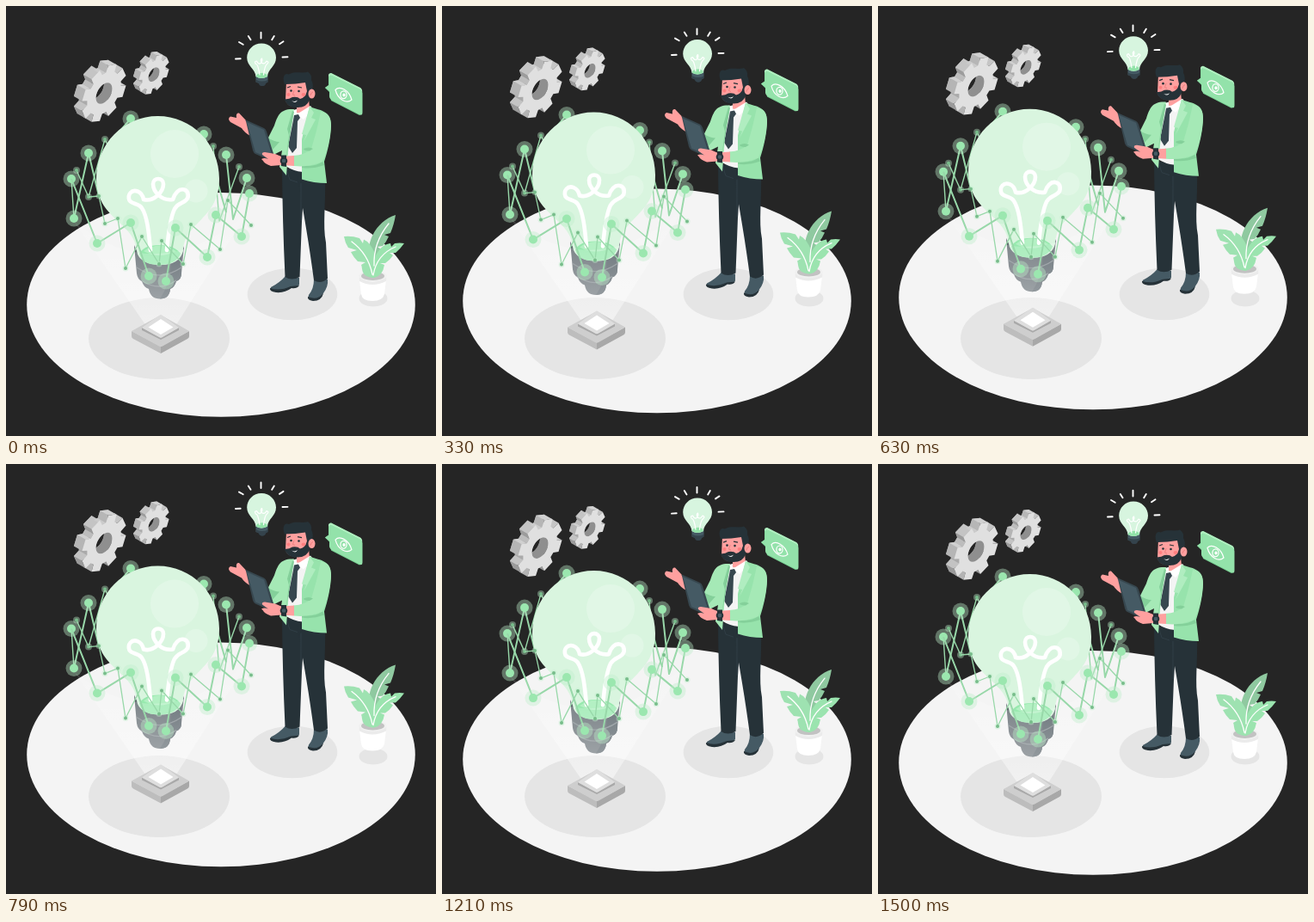
An HTML page for the animation above (1540 ms loop, 500 by 500 pixels).

```html
<!DOCTYPE html>
<html lang="en">
<head>
<meta charset="utf-8">
<title>Floating idea</title>
<style>
  html, body { margin: 0; height: 100%; overflow: hidden; background: #252525; }
  svg { display: block; width: 100vw; height: 100vh; }
  .line { fill: none; stroke: #fff; stroke-linecap: round; stroke-linejoin: round; }
  .net { fill: none; stroke: #98d8a9; stroke-linejoin: round; }
  .skin { fill: #ffa09f; }
  .dark { fill: #263238; }
  .slate { fill: #455a64; }
  .jacket { fill: #a5e9b6; }
  .fold { fill: #84d09a; }
</style>
</head>
<body>
<svg viewBox="0 0 500 500">
  <defs>
    <linearGradient id="beam" x1="0" y1="1" x2="0" y2="0">
      <stop offset="0" stop-color="#fff" stop-opacity=".5"/>
      <stop offset="1" stop-color="#fff" stop-opacity=".05"/>
    </linearGradient>
  </defs>
  <rect width="500" height="500" fill="#252525"/>
  <g class="float"><ellipse cx="250" cy="347.300" rx="225.800" ry="130.400" fill="#f4f4f4"/></g>

  <g fill="#e5e5e5">
    <ellipse cx="178" cy="386.500" rx="82" ry="47.400"/>
    <ellipse cx="333" cy="335" rx="52.300" ry="30.200"/>
    <ellipse cx="427" cy="340" rx="16.500" ry="9.500"/>
  </g>

  <g class="float">
    <g id="gears"></g>

    <!-- small bulb -->
    <path class="line" stroke-width="1.900" d="M296.500 30.800V37.500M281.800 35L284.500 39.300M271 42L275.700 44.700M267 61.500L272.700 61.200M311.800 35L309.200 39.300M322.500 41.300L318 44.300M327.500 59.300L321.500 59.500"/>
    <path class="slate" d="M290.500 81V88.500L294 90Q294.500 93 298 93T302 90L304.500 88.500V81Z"/>
    <path class="dark" opacity=".55" d="M291 86Q298 89 304.500 86V88.500L302 90Q302 93 298 93T294 90L291 88.500Z"/>
    <path fill="#d7f5df" d="M297 43.500C287.500 43.500 280.200 51 280.200 60C280.200 70 290 73 290.500 82Q297 86 304 82C304.500 73 314 70 314 60C314 51 306.500 43.500 297 43.500Z"/>
    <path fill="#92e3a9" d="M292 79.500Q298 76 303 79.500L304 82Q297 86 290.500 82Z"/>
    <path class="line" stroke-width="1.200" d="M295 80Q293 67 290.500 67.500Q288 64.500 291.500 64Q293 67.500 295.500 67Q299 64 297.500 61Q295.500 62 297 66Q301 68.500 303 64Q306.500 65 303.500 67.500Q301 69 299.500 80"/>

    <!-- back of the network -->
    <path class="net" stroke-width="2" d="M79 247L96 171L108 221M256 173L264 248L280 200M145 131L120 160M230 149L256 240"/>
    <path class="net" stroke-width="1.400" d="M76 201L79 247M82 191L96 222L115 155L122 170M241 163L248 250L271 187"/>
    <g id="backNodes"></g>

    <!-- big bulb -->
    <path fill="#5f686e" d="M149 278Q152 287 160 290H197Q205 287 207 279L204 311Q204 318 198 320Q196 327 191 329Q190 340.500 179 340.500T166 329Q160 327 158 320Q153 318 152 311Z"/>
    <path fill="#4f5a61" d="M204 292L204 311Q204 318 198 320Q196 327 191 329Q190 340.500 179 340.500Q190 325 192 300Z"/>
    <path fill="none" stroke="#7d868b" stroke-width="1.300" d="M152 304Q178 322 204 304M157 319Q178 333 198 319"/>
    <path fill="#d9f5df" d="M176.500 128C137 128 105 160 105 201C105 248 150 251 152 285Q155 300 178 301T206 285C207 251 248 248 248 201C248 160 216 128 176.500 128Z"/>
    <g fill="#fff" opacity=".22"><circle cx="196" cy="172" r="28"/><circle cx="221" cy="215" r="13.500"/></g>
    <path fill="#97e9ae" d="M155 288Q160 278 178 278T203 288Q198 301 178 301T155 288Z"/>
    <path fill="#b3f0c3" d="M160 285Q178 272 198 285Q178 295 160 285Z"/>
    <path class="line" stroke-width="4.600" d="M168 284C166 262 164 244 158 235C154 229 147 231 143.500 226C141 219 146 213 153 215.500C157 217 159 220 160 225C172 228 183 216 183 207C183 199 171 199 171 207C171 216 181 227 194 225C196 218 201 212 207 213.500C213 215 213 223 209 226C205 230 200 229 196 236C191 246 189 262 187 284"/>

    <!-- projector -->
    <path fill="url(#beam)" d="M161 369L80 252Q178 330 281 240L199 369Q180 385 161 369Z"/>
    <path fill="#bdbdbd" d="M146 378L180 396V404L148 387Q146 386 146 384Z"/>
    <path fill="#a8a8a8" d="M213 378L180 396V404L211 387Q213 386 213 384Z"/>
    <path fill="#cecece" d="M146 378L177 361Q180 360 183 361L213 378L183 395Q180 397 177 395Z"/>
    <path fill="#a9a9a9" d="M158 374L180 386L201 374V377L180 388L158 377Z"/>
    <path fill="#dedede" d="M158 374L178 360Q180 358 182 360L201 374L182 385Q180 386 178 385Z"/>
    <path fill="#fff" d="M165.500 373.500L180 364L194.500 373.500L180 382Z"/>

    <!-- front of the network -->
    <path class="net" stroke-width="2" d="M76 201L106 276L145 252L166 314M186 320L197 258L234 292L244 243L274 268L283 218"/>
    <path class="net" stroke-width="1.300" d="M96 222L108 221L115 253L130 247L139 305L158 268L178 300L181 273L206 300L215 254L249 283L258 226L285 255"/>
    <g id="frontNodes"></g>

    <!-- speech bubble -->
    <path fill="#76cf91" d="M375 80L378 78L413 96L414 125L411 127L378 110L376 100L371 95L375 92Z"/>
    <path fill="#b0efc0" d="M375 81Q375 78 378 78L412 95Q415 97 414 101L376 83Z"/>
    <path fill="#93e2aa" d="M375.500 83Q376 79.500 379.500 81L412 97Q414.500 98.500 414.500 101.500V124Q414.500 128 411 126L380 110Q376 108 376 105V99L371 95L375.500 92Z"/>
    <path class="line" stroke-width="1.200" d="M383 97.500C388 92 399 98 402 109C396 114 386 109 383 97.500Z"/>
    <ellipse class="line" stroke-width="1.200" cx="392.500" cy="103.300" rx="3.600" ry="4.400"/>
    <ellipse cx="393" cy="103.500" rx="1.600" ry="2" fill="#fff"/>

    <!-- man -->
    <path class="slate" d="M325 314L341 316V324Q338 328 332 327Q324 333 314 332Q306 331 308 327Q318 322 325 314ZM358 318H374Q375 326 369 334Q366 342 357 342Q350 341 352 336Q358 329 358 318Z"/>
    <path class="dark" d="M307 328Q318 332 331 326L341 325Q338 329 332 328Q324 334 314 333Q306 332 307 328ZM351 338Q362 343 369 334Q367 343 357 343Q350 342 351 338Z"/>
    <path class="dark" d="M321 188L348 192L344 250L341.500 315Q332 320 324.500 315Q321.500 250 321 188Z"/>
    <path class="dark" d="M336 190L371 199C372 230 368 255 372 275L374 317Q366 324 358 319C353 280 346 240 340 206Z"/>
    <path fill="none" stroke="#303e46" d="M327 193L330 202L339 205M343 206L343 250"/>
    <path fill="#f4f4f4" d="M334 121L352 116L357 126L345 155V193Q334 192 325 186L329 145Z"/>
    <path class="skin" d="M338 112L352 108L353 119Q346 125 338 124Z"/>
    <path fill="#fff" d="M333 120L338 123L336 132L331 127ZM338 126L354 116L357 120L346 132Z"/>
    <path fill="#37474f" d="M335 127L340 126L342 130L339 134L338 165L333 171L328 163L334 133Z"/>
    <path class="skin" d="M284 151Q277 147 274 142L261 135Q257 131 261 128.500L268 130Q267 124 271 124.500L279 133L283 139L294 151Z"/>
    <path class="jacket" d="M335 120C319 119 316 127 312 139L304 155L311 173L321 168L318 187L326 197L330 145Z"/>
    <path class="fold" d="M304 153Q312 158 318 158L310 167ZM333 122L327 143L329 150L325 182L331 146L335 123Z"/>
    <path fill="#97e3ac" d="M353 117C367 122 378 122 378 138C378 152 374 169 370 181L373 206Q358 206 344 201.500V155Z"/>
    <path fill="#b0edc0" d="M353 117L344 149L349 150L346 158L360 132L355 130L358 124Z"/>
    <path class="fold" d="M344 185Q358 188 368 181L370 185Q356 190 344 188Z"/>
    <path class="jacket" d="M366 123Q378 124 378 140Q376 165 368 181Q352 188 335 186L334 174Q348 173 355 166L361 145Z"/>
    <path class="fold" d="M357 166Q352 163 346 166Q346 168 353 168.500Z"/>
    <path fill="#37474f" d="M279 134Q277 132 280 133L300 142Q302 143 303 146L313 178Q314 183 310 181L290 172Q288 171 287 168Z"/>
    <path class="slate" d="M280 135L300 144L311 179L290 170Z"/>
    <path class="skin" d="M335 174V186L320 185L308 186Q300 183 299 180L297 178Q300 176 305 178L298 173Q297 170 301 170L313 172L320 175Z"/>
    <path class="dark" d="M320 173.500L326 173.500V187L320 186Z"/>
    <circle cx="323" cy="180" r="4.300" class="dark"/><circle cx="323" cy="180" r="2.300" class="slate"/>
    <path class="skin" d="M326 88L350 87L352 110Q346 117 335 117Q326 116 325 109Z"/>
    <path class="dark" d="M324 91C321 84 323 77 329 79.500C335 75 345 79 351 76.500Q356 80 355 86Q358 91 356 98L353 109Q350 118 339 118Q326 118 324 108Q328 109 333 106Q339 105 342 108Q348 107 350 99L348 89Q337 91 324 91Z"/>
    <ellipse class="skin" cx="355.500" cy="102" rx="4" ry="5.500"/>
    <path fill="none" stroke="#e87878" stroke-width=".8" d="M354 104Q355 100 357 100M335 98L333.500 103L336 104"/>
    <ellipse cx="346" cy="103" rx="2.500" ry="2" fill="#ff7f80"/>
    <ellipse cx="328.500" cy="103" rx="2" ry="2" fill="#ff7f80"/>
    <path fill="none" stroke="#263238" stroke-width="1.200" d="M327 95L331 93.500M339 94L344 95"/>
    <circle cx="331.500" cy="98.500" r="1.300" class="dark"/><circle cx="340.500" cy="99" r="1.300" class="dark"/>
    <path fill="#fff" d="M332 110Q336 112 339 109.500Q337 114 332 110Z"/>

    <!-- plant -->
    <path fill="#fff" d="M410.500 314H442.500L440 335Q438 343 426 343T413 335Z"/>
    <path fill="#ebebeb" d="M410.500 314Q426 327 442.500 314L442 320Q426 328 411 320Z"/>
    <ellipse cx="426.500" cy="314" rx="16" ry="6.500" fill="#f0f0f0"/>
    <ellipse cx="426.500" cy="314" rx="13.500" ry="5" fill="#c2c2c2"/>
    <path fill="#8fc9a0" d="M425 300C415 278 430 250 453 243Q451 255 447 264L440 266L445 268Q442 275 438 279L432 280L436 283Q436 298 430 308Z"/>
    <path fill="#9ee2b1" d="M427 316C412 315 415 305 413 301L418 298L409 297Q404 292 401 286L408 284L398 281Q394 275 393 268Q402 267 411 270L415 276L416 271.500Q424 275 429 288Q431 305 427 316Z"/>
    <path fill="#9be4af" d="M426 316C424 295 434 277 447 276L448 280L452 276Q458 275 463 276Q458 283 453 287L446 287L450 290Q446 296 441 299L435 299L440 301Q438 314 428 316Z"/>
    <path class="line" stroke-width="1.300" d="M428 302Q427 275 445 253M426 312Q421 288 402 274M427 313Q431 289 453 280"/>
  </g>
</svg>
<script>
const byId = id => document.getElementById(id);

// Isometric gear: visible side walls receding to the upper left, then the front face.
function gear(cx, cy, radius, hole, depth) {
  const back = [-.87 * depth, -.5 * depth];
  const project = (r, a) => [cx + .866 * r * Math.cos(a), cy + r * Math.sin(a) - .5 * r * Math.cos(a)];
  const shift = ([x, y]) => [x + back[0], y + back[1]];
  const poly = points => 'M' + points.map(p => p.map(v => v.toFixed(1)).join(' ')).join('L') + 'Z';

  const outline = [], bore = [];
  for (let i = 0; i < 8; i++) {
    const a = (i + .5) * Math.PI / 4;
    for (const [r, da] of [[.76, -.28], [1, -.2], [1, .2], [.76, .28]])
      outline.push(project(radius * r, a + da));
  }
  for (let i = 0; i < 32; i++) bore.push(project(hole, i * Math.PI / 16));

  let walls = '';
  outline.forEach((p, i) => {
    const q = outline[(i + 1) % outline.length];
    const nx = q[1] - p[1], ny = p[0] - q[0];
    if (nx * back[0] + ny * back[1] <= 0) return;
    const grey = Math.round(170 - 38 * ny / Math.hypot(nx, ny));
    walls += `<path fill="rgb(${grey},${grey},${grey})" d="${poly([p, q, shift(q), shift(p)])}"/>`;
  });
  const bores = poly(bore);
  const face = poly(outline);
  return `<path fill="#b0b0b0" fill-rule="evenodd" d="${poly(outline.map(shift))}${poly(bore.map(shift))}"/>` +
    `<path fill="#8f8f8f" fill-rule="evenodd" d="${bores}${poly(bore.map(shift))}"/>` +
    walls + `<path fill="#e0e0e0" fill-rule="evenodd" d="${face}${bores}"/>`;
}

const nodes = (points, r, halo) => points.map(([x, y]) =>
  `<circle cx="${x}" cy="${y}" r="${halo}" fill="#bfeecb" opacity=".4"/>` +
  `<circle cx="${x}" cy="${y}" r="${r}" fill="${r > 3 ? '#9be7af' : '#78bd8b'}"/>`).join('');

byId('gears').innerHTML = gear(114, 101.5, 30, 11, 11) + gear(172, 79.700, 20.700, 7.500, 7.500);
byId('backNodes').innerHTML =
  nodes([[76, 201], [96, 171], [145, 131], [230, 149], [256, 173], [280, 200], [79, 247]], 5, 9.5) +
  nodes([[115, 155], [82, 191], [96, 222], [241, 163], [271, 187]], 2, 4);
byId('frontNodes').innerHTML =
  nodes([[106, 276], [145, 252], [166, 314], [186, 320], [197, 258], [234, 292], [244, 243], [274, 268], [283, 218]], 5, 9.5) +
  nodes([[108, 221], [130, 247], [115, 253], [158, 268], [139, 305], [181, 273], [178, 300], [206, 300],
    [215, 254], [249, 283], [258, 226], [285, 255]], 2, 3.5);

// Linear rise and fall of 10 units over 36 steps at 24 per second, then one step of rest.
const LOOP = 1540, STEP = 1000 / 24, HALF = 18, RISE = 10;
const floating = document.querySelectorAll('.float');
const start = performance.now();

function draw(now) {
  const t = Math.max(0, now - start) % LOOP;
  const step = Math.min(2 * HALF, Math.floor((t + 5) / STEP));
  const lift = RISE * (1 - Math.abs(1 - step / HALF));
  floating.forEach(g => g.setAttribute('transform', `translate(0 ${-lift})`));
  requestAnimationFrame(draw);
}
draw(start);
</script>
</body>
</html>
```
